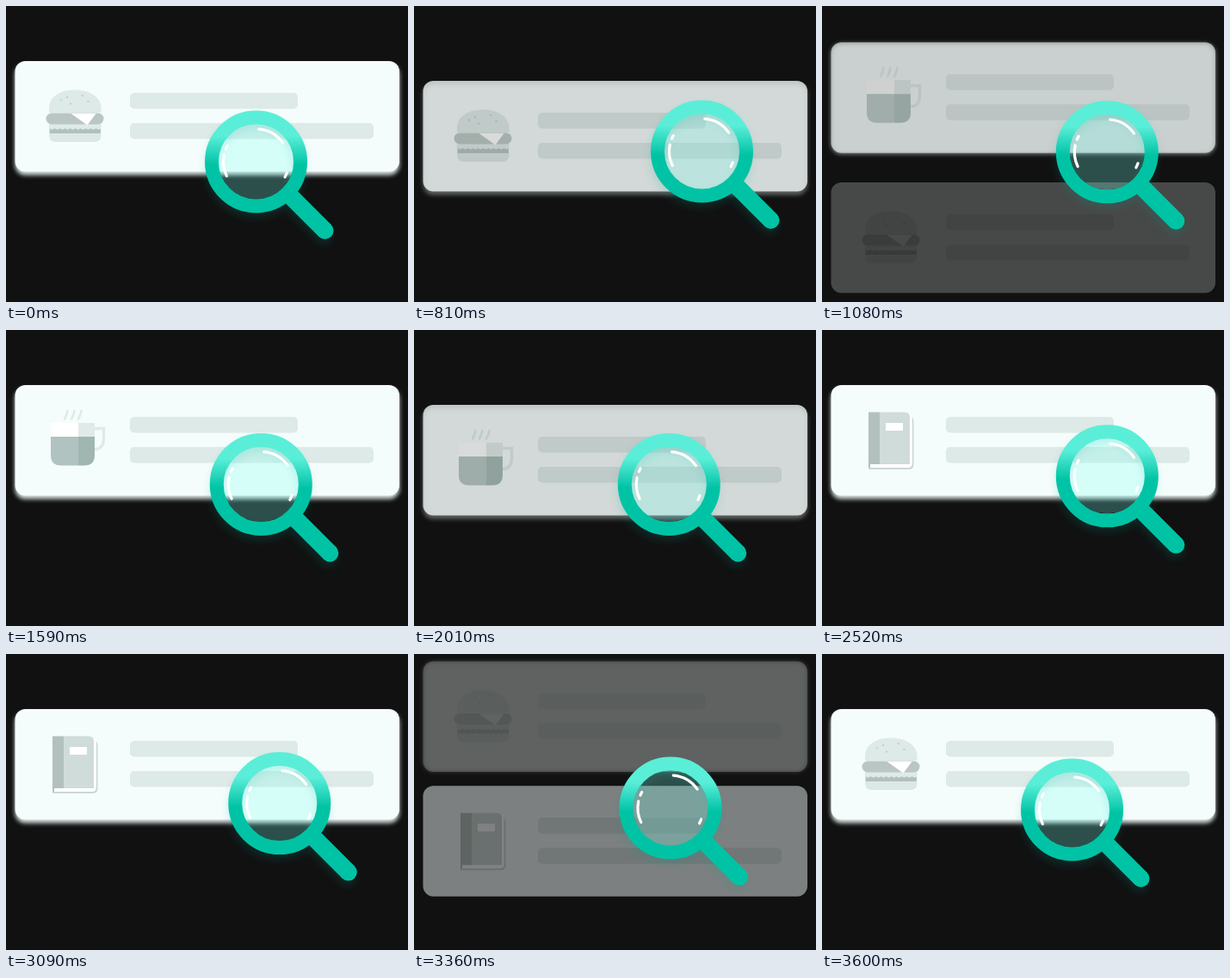
Recreate the animation shown at these times as an HTML page. Size 467 px wide and 344 px high, loop 3.69 s.

```html
<!DOCTYPE html>
<html lang="en">
<head>
<meta charset="utf-8">
<title>Search loop</title>
<style>
  html, body { margin: 0; width: 100%; height: 100%; overflow: hidden; background: #111; }
  svg { display: block; width: 467px; height: 344px; }
</style>
</head>
<body>
<svg viewBox="0 0 467 344">
  <defs>
    <filter id="soft" filterUnits="userSpaceOnUse" x="-10" y="40" width="490" height="180" color-interpolation-filters="sRGB">
      <feGaussianBlur stdDeviation="2.5"/>
    </filter>
    <filter id="shade" filterUnits="userSpaceOnUse" x="-90" y="-90" width="210" height="220" color-interpolation-filters="sRGB">
      <feDropShadow dx="-1" dy="6" stdDeviation="5" flood-color="#00a48c" flood-opacity=".16"/>
    </filter>
    <linearGradient id="metal" gradientUnits="userSpaceOnUse" x1="0" y1="-30" x2="0" y2="4">
      <stop offset="0" stop-color="#5aeed8"/>
      <stop offset="1" stop-color="#00c3a5"/>
    </linearGradient>
    <rect id="glow" x="10.5" y="64" width="446.5" height="128.5" rx="12" fill="#f0fbf9" filter="url(#soft)"/>
    <g id="base">
      <rect x="10.5" y="64" width="446.5" height="128.5" rx="12" fill="#f5fdfc"/>
      <g fill="#deeae7">
        <rect x="144" y="101" width="195" height="18.5" rx="5"/>
        <rect x="144" y="136" width="283" height="18.5" rx="5"/>
      </g>
    </g>
    <g id="burger">
      <path d="M50 124v-5C50 106 62 97.500 80 97.500S110.500 106 110.500 119v5z" fill="#deeae7"/>
      <g fill="#c5d3cf">
        <circle cx="64" cy="109.500" r="1.300"/><circle cx="71" cy="106" r="1.300"/>
        <circle cx="75" cy="113.500" r="1.300"/><circle cx="89" cy="104" r="1.300"/>
        <circle cx="95.500" cy="111" r="1.300"/>
      </g>
      <rect x="50.500" y="137" width="59.500" height="11.500" fill="#b2c0bd"/>
      <path d="M50 137h60.500v5q-3 3-6 0-3 3-6 0-3 3-6 0-3 3-6 0-3 3-6 0-3 3-6 0-3 3-6 0-3 3-6 0-3 3-6 0-3 3-6 0z" fill="#deeae7"/>
      <rect x="46.500" y="124.500" width="67" height="13" rx="6.500" fill="#b9c6c3"/>
      <path d="M75.500 125h29l-10 13.500z" fill="#fff"/>
      <path d="M50 148h60.500v2q0 8-8 8h-44.500q-8 0-8-8z" fill="#dbe8e5"/>
    </g>
    <g id="cup">
      <path d="M103 114.500h10.500v11q0 13-10.500 13" fill="none" stroke="#deeae7" stroke-width="3.300"/>
      <path d="M71.500 94q-1 5-3.500 9.500M79.500 94q-1 5-3.500 9.500M87.500 94q-1 5-3.500 9.500"
        fill="none" stroke="#deeae7" stroke-width="2.600" stroke-linecap="round"/>
      <path d="M52 108h32v16h-32z" fill="#fff"/>
      <path d="M84 108h19v16h-19z" fill="#e0ebe8"/>
      <path d="M52 124h32v33.500h-20q-12 0-12-12z" fill="#b1c3c0"/>
      <path d="M84 124h19v21.500q0 12-12 12h-7z" fill="#a0b6b1"/>
    </g>
    <g id="book">
      <path d="M54 100h46q6.500 0 6.500 6v50q0 6-6 6h-46.500z" fill="#cbd8d5"/>
      <path d="M56 155.500h46V98q2.800 2 2.800 6v51q0 5-5 5H56z" fill="#fff"/>
      <path d="M67 95.500h29q6 0 6 6v54.500h-35z" fill="#cfdcd9"/>
      <path d="M54 95.500h13v60.500h-11v4h-2z" fill="#b2c1bd"/>
      <rect x="74" y="108" width="20" height="9" fill="#fff"/>
    </g>
  </defs>
  <rect width="467" height="344" fill="#111"/>
  <g id="cards"></g>
  <g id="glass">
    <g filter="url(#shade)">
      <path d="M35 35L80 80" stroke="#00c3a5" stroke-width="20"/>
      <circle cx="80" cy="80" r="10" fill="#00c3a5"/>
      <circle r="51.500" fill="none" stroke="url(#metal)" stroke-width="16"/>
    </g>
    <circle r="43.500" fill="#7dffee" fill-opacity=".26"/>
    <g id="shine" fill="none" stroke="#fff" stroke-width="3.200" stroke-linecap="round"></g>
  </g>
</svg>
<script>
const NS = 'http://www.w3.org/2000/svg';
const CYCLE = 3600, LOOP = 3690, STEP = 30, SLOT = 1200, LEAD = 300, HOLD = 690;
const $ = id => document.getElementById(id);

function add(parent, tag, attrs = {}) {
  const el = document.createElementNS(NS, tag);
  for (const key in attrs) el.setAttribute(key, attrs[key]);
  return parent.appendChild(el);
}

const ramp = (x, a, b) => Math.min(1, Math.max(0, (x - a) / (b - a)));
const smooth = p => p * p * (3 - 2 * p);

const cards = ['burger', 'cup', 'book'].map(icon => {
  const root = add($('cards'), 'g');
  const glow = add(root, 'use', { href: '#glow' });
  const face = add(root, 'g');
  add(face, 'use', { href: '#base' });
  add(face, 'use', { href: '#' + icon });
  return { root, glow, face };
});

// Reflections on the lens: start and end angle in degrees
for (const [a, b] of [[-85, -35], [154, 192], [203, 209], [20, 28]]) {
  const at = deg => {
    const r = deg * Math.PI / 180;
    return (38 * Math.cos(r)).toFixed(2) + ' ' + (38 * Math.sin(r)).toFixed(2);
  };
  add($('shine'), 'path', { d: `M${at(a)}A38 38 0 0 1 ${at(b)}` });
}

// u is the time since the card settled in the middle
function pose(u) {
  if (u < 0) {
    const p = ramp(u, -LEAD, 0);
    return { y: -62 * (1 - smooth(p)), alpha: p, light: 0.88 * p, shift: 4 * p * p };
  }
  const p = ramp(u, HOLD, SLOT);
  return { y: 164 * smooth(p), alpha: 1 - p, light: 0.88 * (1 - ramp(u, HOLD, HOLD + 200)), shift: 4 };
}

function draw(t) {
  cards.forEach(({ root, glow, face }, i) => {
    const u = (t - SLOT * i + CYCLE + LEAD) % CYCLE - LEAD;
    root.setAttribute('display', u < SLOT ? 'inline' : 'none');
    if (u >= SLOT) return;
    const { y, alpha, light, shift } = pose(u);
    root.setAttribute('transform', `translate(0 ${y})`);
    face.setAttribute('opacity', alpha);
    glow.setAttribute('opacity', light);
    glow.setAttribute('y', shift);
  });
  const k = (1 - Math.cos(t / 900 * Math.PI)) / 2;
  $('glass').setAttribute('transform', `translate(${290.5 + 45.1 * k} ${181 - 12.3 * k})`);
}

const start = performance.now();
function tick() {
  const t = (performance.now() - start) % LOOP;
  draw(Math.min(CYCLE, Math.floor(t / STEP) * STEP));
  requestAnimationFrame(tick);
}
tick();
</script>
</body>
</html>
```
